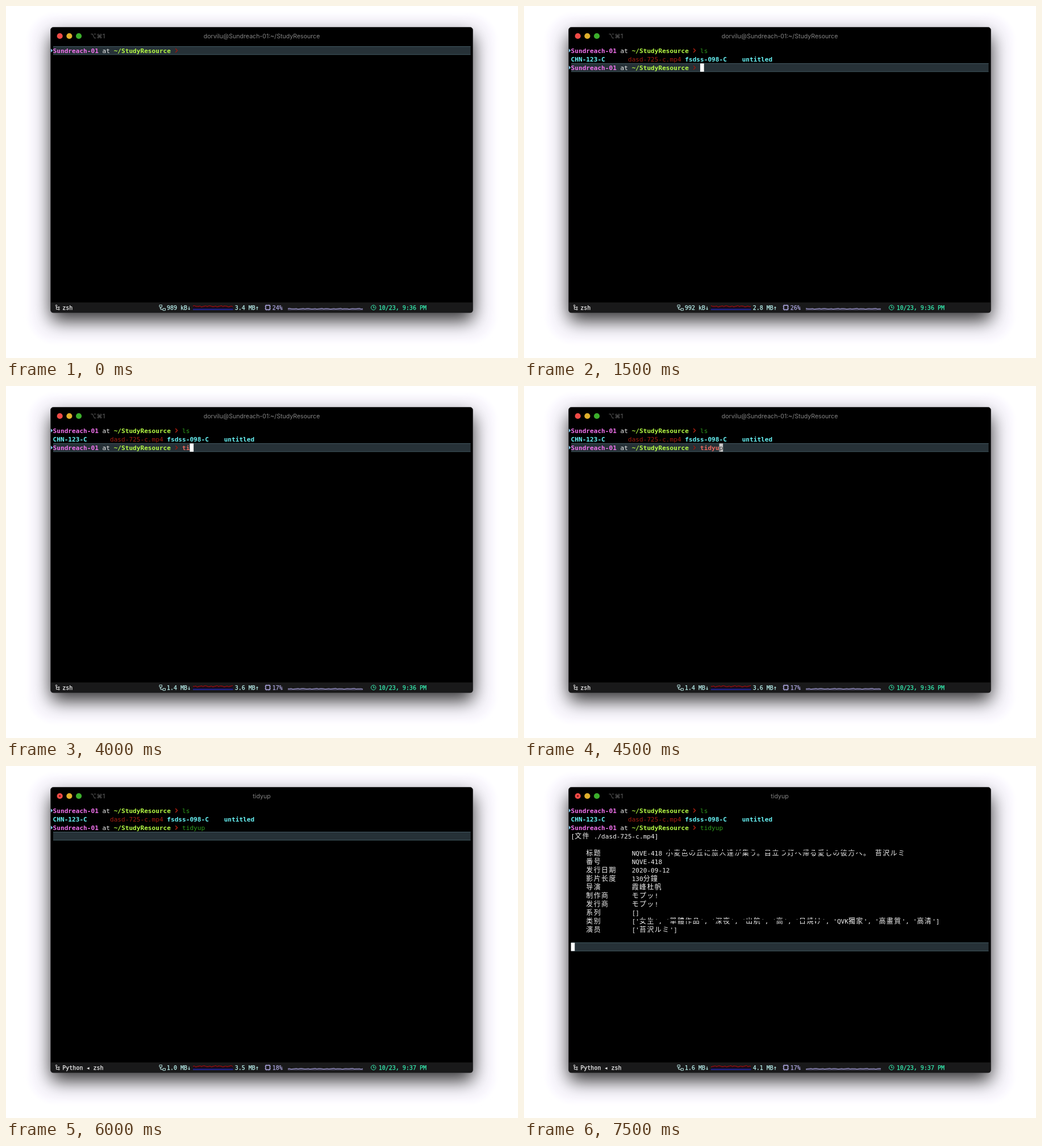
Write an HTML page that moves like this. It is 901 px wide and 621 px high and loops after 8 s.

```html
<!DOCTYPE html>
<html lang="en">
<head>
<meta charset="utf-8">
<title>Terminal</title>
<style>
  html, body { margin: 0; width: 100%; height: 100%; overflow: hidden; background: #fff; }
  svg { display: block; width: 100vw; height: 100vh; }
  text { white-space: pre; }
  .mono { font-family: "DejaVu Sans Mono", monospace; font-size: 11.11px; }
  .wide { font-family: "Noto Sans CJK SC", "Noto Sans CJK JP", "Noto Sans CJK", sans-serif; font-size: 12px; letter-spacing: 1.38px; }
  .bold { font-weight: 700; }
  .bar { font-family: "DejaVu Sans Mono", monospace; font-size: 10px; stroke-width: .25; }
  .title { font-family: Inter, sans-serif; font-size: 10.6px; fill: #858585; text-anchor: middle; }
  .keys { font-family: Inter, "DejaVu Sans", sans-serif; font-size: 10.6px; fill: #666; }
  .line { fill: none; stroke-width: 1; }
</style>
</head>
<body>
<svg viewBox="0 0 901 621" preserveAspectRatio="none">
  <defs>
    <filter id="soft" x="-20%" y="-20%" width="140%" height="140%"><feGaussianBlur stdDeviation="16"/></filter>
    <filter id="rim" x="-20%" y="-20%" width="140%" height="140%"><feGaussianBlur stdDeviation="4"/></filter>
  </defs>
  <rect x="40" y="15" width="821" height="578" rx="46" fill="#faf8fe" filter="url(#rim)"/>
  <rect x="79" y="52" width="743" height="503" rx="6" opacity=".8" filter="url(#soft)"/>
  <rect x="78.5" y="37.5" width="743" height="503.5" rx="5" stroke="#3b3b3d"/>
  <path d="M79 523H821.2V537a4 4 0 0 1-4 4H83a4 4 0 0 1-4-4Z" fill="#19191a"/>
  <circle cx="94.7" cy="53" r="5.1" fill="#ef4a46"/>
  <circle cx="111.4" cy="53" r="5.1" fill="#e0b02c"/>
  <circle cx="128.1" cy="53" r="5.1" fill="#3cae2c"/>
  <text class="keys" x="148.5" y="57">⌥⌘1</text>
  <g class="line" stroke="#e8e8e8">
    <circle cx="88.6" cy="528.6" r="1.3"/>
    <path d="M88.6 530V535.2H92M88.6 531.6H92"/>
    <circle cx="93.1" cy="531.6" r="1.1"/><circle cx="93.1" cy="535.2" r="1.1"/>
  </g>
  <g class="line" stroke="#b5dfdc">
    <path d="M270 527.5h4.5v3.5H270ZM276 533.5h4.5v3.5H276ZM272.2 531v4.5H276M270.5 533h3"/>
  </g>
  <g class="line" stroke="#aaa4dd">
    <rect x="457" y="528.2" width="7.4" height="7.4" stroke-width="1.5"/>
    <path d="M459 526.6v1.4M462.4 526.6v1.4M459 536v1.4M462.4 536v1.4M455.4 530.2h1.4M455.4 533.6h1.4M464.6 530.2H466M464.6 533.6H466" stroke-width=".8"/>
  </g>
  <g class="line" stroke="#36edb1"><circle cx="646.7" cy="532" r="4.2"/><path d="M646.7 529.2V532.3H649"/></g>
  <g id="screen"></g>
</svg>
<script>
const LOOP = 8000, STEP = 500;
const LEFT = 82.6, CELL = 6.69, ROW = 15.03;
const C = {
  host: '#f272ee', text: '#f0f0f0', path: '#b5fb45', arrow: '#b3200f', ok: '#2f9e1d',
  bad: '#ee6a60', dir: '#69f6f8', file: '#a51b0f', net: '#b9efec', cpu: '#aaa4dd', clock: '#36edb1'
};
const HOST = 'Sundreach-01';

// [start ms, download, upload, cpu load]
const STATS = [
  [0, '989 kB', '3.4 MB', 24], [1000, '992 kB', '2.8 MB', 26],
  [2500, '1.4 MB', '2.9 MB', 16], [4000, '1.4 MB', '3.6 MB', 17],
  [5500, '1.0 MB', '3.5 MB', 18], [6500, '1.0 MB', '2.9 MB', 18],
  [7500, '1.6 MB', '4.1 MB', 17]
];

const DETAILS = [
  ['标题', 'NQVE-418 小麦色の丘に旅人達が集う。目立つ灯へ帰る愛しの彼方へ。 苔沢ルミ'],
  ['番号', 'NQVE-418'],
  ['发行日期', '2020-09-12'],
  ['影片长度', '130分鐘'],
  ['导演', '霞峰杜帆'],
  ['制作商', 'モプッ!'],
  ['发行商', 'モプッ!'],
  ['系列', '[]'],
  ['类别', "['女生', '單體作品', '深夜', '出航', '高', '日焼け', 'QVK獨家', '高畫質', '高清']"],
  ['演员', "['苔沢ルミ']"]
];

const colX = col => LEFT + col * CELL;
const rowY = row => 71 + row * ROW;
const rect = (x, y, w, h, fill) => `<rect x="${x}" y="${y}" width="${w}" height="${h}" fill="${fill}"/>`;

// Places text on the terminal grid; CJK characters take two cells.
function put(col, row, str, fill, cls = '') {
  let out = '';
  for (const run of str.match(/[\u3000-\u9fff\uff00-\uffef]+|[^\u3000-\u9fff\uff00-\uffef]+/g)) {
    const wide = run.charCodeAt(0) >= 0x3000;
    out += `<text class="${wide ? 'wide' : 'mono'} ${cls}" x="${colX(col)}" y="${rowY(row) + 11.5}" fill="${fill}">${run}</text>`;
    col += run.length * (wide ? 2 : 1);
  }
  return out;
}

function prompt(row, active) {
  const y = rowY(row) + 7.6;
  return `<path d="M79 ${y - 3.4}l3.4 3.4-3.4 3.4Z" fill="#7cc4e6"/>` +
    put(0, row, HOST, C.host, 'bold') + put(13, row, 'at', C.text) +
    put(16, row, '~/StudyResource', C.path, 'bold') +
    `<path class="line" d="M298.2 ${y - 3.5}l3.3 3.5-3.3 3.5" stroke="${active ? '#96190f' : C.arrow}" style="stroke-width:1.5"/>`;
}

function guide(row) {
  const y = rowY(row);
  return rect(83, y, 734.5, 15, '#263137') +
    rect(83, y, 734.5, .8, '#4a636c') + rect(83, y + 14.4, 734.5, .8, '#4a636c');
}

const cursor = (col, row, fill = '#fff') => rect(colX(col), rowY(row) + .3, CELL, 14.6, fill);

function details() {
  const rows = DETAILS.map(([label, value], i) =>
    put(4, 5 + i, label, C.text) + put(16, 5 + i, value, C.text));
  return put(0, 3, '[文件 ./dasd-725-c.mp4]', C.text) + rows.join('') +
    rect(249, 149.9, 361, 2.6, '#000') + rect(203, 270.8, 336, 2.4, '#000');
}

function terminal(t) {
  const row = t < 1500 ? 0 : t < 5000 ? 2 : t < 6500 ? 3 : 16;
  const blink = Math.floor(t / STEP) % 2 === 1;
  const atPrompt = t < 5000;
  let out = guide(row) + prompt(0, row === 0);
  if (t >= 1000) out += put(34, 0, 'ls', C.ok);
  if (t >= 1500) {
    out += put(0, 1, 'CHN-123-C', C.dir, 'bold') + put(15, 1, 'dasd-725-c.mp4', C.file) +
      put(30, 1, 'fsdss-098-C', C.dir, 'bold') + put(45, 1, 'untitled', C.dir, 'bold') +
      prompt(2, row === 2);
  }
  if (t >= 5000) out += put(34, 2, 'tidyup', C.ok);
  if (t >= 6500) out += details();

  if (t >= 4500 && atPrompt) {
    out += put(34, 2, 'tidyu', C.bad, 'bold') + cursor(39, 2, '#c9c9c9') + put(39, 2, 'p', '#333');
  } else if (t >= 4000 && atPrompt) {
    out += put(34, 2, 'ti', C.bad, 'bold') + cursor(36, 2);
  } else if (t >= 1000 && t < 1500) {
    out += cursor(36, 0);
  } else if (blink) {
    out += cursor(atPrompt ? 34 : 0, row);
  }
  return out;
}

const wave = i => Math.sin(i * 1.7) * .5 + Math.sin(i * .63 + 1) * .35 + Math.sin(i * 2.9) * .3;

function trace(x, width, y, height, gap, shift) {
  const points = [];
  for (let d = 0; d <= width; d += gap) {
    points.push(`${x + d} ${(y - height * wave(d / gap + shift)).toFixed(2)}`);
  }
  return 'M' + points.join('L');
}

function statusBar(t) {
  const step = STATS.findLastIndex(s => s[0] <= t);
  const [, down, up, load] = STATS[step];
  const label = (x, str, fill) =>
    `<text class="bar" x="${x}" y="535.6" fill="${fill}" stroke="${fill}">${str}</text>`;
  const red = trace(329, 70, 529.8, 1.3, 2.5, step);
  const cpu = trace(496, 132, 534, .8, 3, step);
  return label(99.3, t < 5500 ? 'zsh' : 'Python ◂ zsh', '#f0f0f0') +
    label(283, down + '↓', C.net) + label(402.7, up + '↑', C.net) +
    label(468.7, load + '%', C.cpu) +
    label(655.7, `10/23, 9:${t < 5500 ? 36 : 37} PM`, C.clock) +
    `<path d="${red}V536H329Z" fill="#1c0b16"/>` + rect(329, 533, 70.5, 3, '#14144a') +
    `<path class="line" d="${red}" stroke="#c90d0d"/>` + rect(329, 535.2, 70.5, 1.1, '#2b31b8') +
    `<path d="${cpu}V536H496Z" fill="#3b3950"/><path class="line" d="${cpu}" stroke="${C.cpu}"/>` +
    rect(496, 535.6, 132, .7, '#8480ab');
}

function titleBar(t) {
  const running = t >= 5000;
  const title = running ? 'tidyup' : `dorvilu@${HOST}:~/StudyResource`;
  return `<text class="title" x="450" y="57">${title}</text>` +
    (running ? '<circle cx="94.7" cy="53" r="1.4" fill="#5c0c0a"/>' : '');
}

const screen = document.getElementById('screen');
let shown = -1;

function draw(now) {
  const t = Math.floor(now % LOOP / STEP) * STEP;
  if (t !== shown) {
    shown = t;
    screen.innerHTML = titleBar(t) + terminal(t) + statusBar(t);
  }
}

const start = performance.now();
function tick() {
  draw(performance.now() - start);
  requestAnimationFrame(tick);
}
tick();
</script>
</body>
</html>
```
